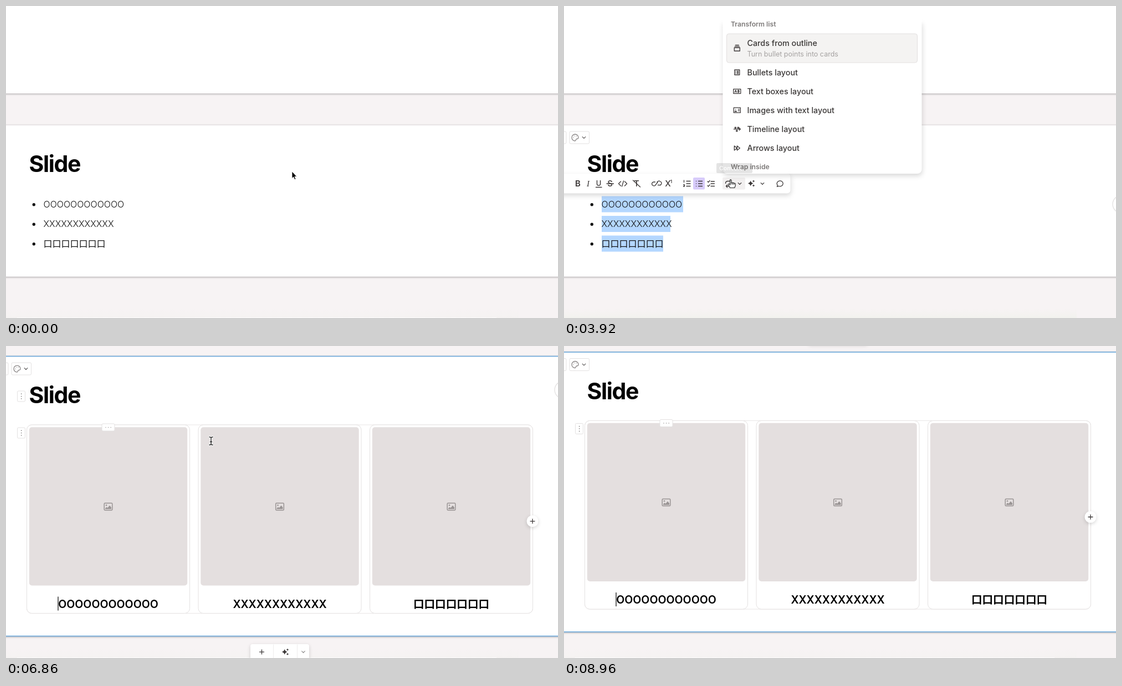
An HTML page that plays this animation: 996 by 562 pixels, repeating every 9100 ms.

```html
<!DOCTYPE html>
<html lang="en">
<head>
<meta charset="utf-8">
<title>Slide list to image layout</title>
<style>
  html, body { margin: 0; width: 100%; height: 100%; overflow: hidden; background: #f7f3f4; }
  svg { display: block; width: 996px; height: 562px; font-family: Inter, "Noto Sans CJK JP", "Noto Sans CJK SC", sans-serif; font-optical-sizing: none; }
  .card { fill: #fff; stroke: #e4e0e1; filter: drop-shadow(0 1px 1.5px rgba(0,0,0,.28)); }
  .card.active { stroke: #72abdb; stroke-width: 1.7; }
  .chip { fill: #fff; stroke: #e3e1e1; }
  .float { fill: #fff; filter: drop-shadow(0 2px 3px rgba(0,0,0,.16)); }
  .panel { fill: #fff; filter: drop-shadow(1px 4px 4px rgba(0,0,0,.15)); }
  .line { fill: none; stroke: #3c3838; stroke-width: 1.3; stroke-linecap: round; stroke-linejoin: round; }
  .soft { stroke: #8b8787; }
  .title { font-size: 41px; font-weight: 700; letter-spacing: -1.35px; }
  .list { font-size: 16px; font-weight: 300; fill: #111; }
  .caption { font-size: 19.6px; font-weight: 600; text-anchor: middle; }
  .head { font-size: 12.2px; font-weight: 600; fill: #7d7a79; }
  .item { font-size: 14.3px; font-weight: 500; fill: #3a3736; }
  .sub { font-size: 12.5px; fill: #a5a2a1; }
  .tip { font-size: 10.6px; font-weight: 600; fill: #fff; }
  .mark { fill: #3c3838; font-size: 15px; font-weight: 600; text-anchor: middle; }
</style>
</head>
<body>
<svg viewBox="0 0 996 562">
  <defs>
    <linearGradient id="dusk" x2="0" y2="1">
      <stop stop-color="#f3f2ef" stop-opacity="0"/><stop offset="1" stop-color="#f2f2ee"/>
    </linearGradient>
    <path id="chevron" class="line" d="M-2.8 -1.4L0 1.4L2.8 -1.4"/>
    <path id="plus" class="line" d="M-4 0H4M0 -4V4"/>
    <path id="star" fill="#3c3838" d="M0 -5Q.9 -.9 5 0Q.9 .9 0 5Q-.9 .9 -5 0Q-.9 -.9 0 -5Z"/>
    <g id="sparkle">
      <use href="#star" x="-1.3"/>
      <use href="#star" transform="translate(4 -4)scale(.46)"/>
      <use href="#star" transform="translate(4 4)scale(.46)"/>
    </g>
    <g id="addBar">
      <rect class="float" x="441" y="14.5" width="106" height="28" rx="4"/>
      <path stroke="#efeded" d="M482.5 15V42M525.5 15V42"/>
      <use href="#plus" x="461.5" y="28.5"/>
      <use href="#sparkle" x="504" y="28.5"/>
      <use href="#chevron" x="536.5" y="28.5" opacity=".55"/>
    </g>
    <g id="handle">
      <rect class="chip" x="20.5" y="-9.5" width="14" height="19" rx="2"/>
      <path class="line" d="M27.7 -4.3v.1M27.7 0v.1M27.7 4.3v.1" stroke-width="1.7"/>
    </g>
    <g id="more">
      <rect class="chip" x="-11.5" y="-6.5" width="23" height="13" rx="2"/>
      <path class="line soft" d="M-4.6 0h.1M0 0h.1M4.6 0h.1" stroke-width="1.8"/>
    </g>
    <g id="picture">
      <rect x="-7.3" y="-6.3" width="14.6" height="12.6" rx="1.5" fill="none" stroke="#999494" stroke-width="1.5"/>
      <circle cx="-3.5" cy="-2.5" r="1.3" fill="#999494"/>
      <path fill="#999494" d="M-5.5 4.5V3L-3 .8L-1 2.2L2.5 -2L5.5 1.5V4.5Z"/>
    </g>
  </defs>

  <rect width="996" height="562" fill="#f7f3f4"/>
  <rect id="dock" y="545" width="925" height="17" fill="url(#dusk)"/>
  <path id="edge" d="M20 561.5H885" stroke="#fdfcfc"/>

  <g id="page">
    <rect class="card" x="-20" y="-300" width="1036" height="457.5"/>
    <use id="prevBar" href="#addBar" y="158"/>
    <rect id="card" class="card" x="-20" y="214.5" width="1036"/>
    <use id="bar" href="#addBar"/>
    <g id="palette">
      <rect class="chip" x="-20" y="226" width="24" height="22" rx="2"/>
      <rect class="chip" x="10" y="226" width="35.5" height="22" rx="2"/>
      <g transform="translate(20 237)">
        <path class="line soft" d="M0 -6A6 6 0 1 0 0 6C2 6 .8 3.4 2.4 2.6S6 3 6 0A6 6 0 0 0 0 -6Z"/>
        <path class="line soft" d="M-3 0v.1M-1.5 -3v.1M2 -2.6v.1" stroke-width="1.6"/>
      </g>
      <use href="#chevron" x="36" y="237" opacity=".8"/>
    </g>
    <text class="title" x="41.5" y="299">Slide</text>
    <g id="list" class="list"></g>
    <g id="gallery">
      <rect x="37.5" y="338" width="913" height="339.5" rx="9" fill="none" stroke="#e9e6e6"/>
    </g>
    <use id="rowHandle" href="#handle"/>
    <use id="titleHandle" href="#handle" y="286.5"/>
    <circle id="comment" class="chip" cx="1006" r="16" stroke-width="1.3"/>
  </g>

  <g id="format">
    <rect class="panel" x="-20" y="302" width="428.5" height="35.5" rx="6"/>
    <rect x="233" y="309" width="21" height="21.5" rx="2" fill="#d7cbfa"/>
    <rect id="convertHover" x="286" y="309" width="41" height="21.5" rx="2" fill="#f2f0f0"/>
    <g class="mark">
      <text x="25" y="325">B</text>
      <text x="43.5" y="325" font-style="italic" font-weight="500" font-family="Liberation Serif, serif">I</text>
      <text x="62.5" y="324" font-size="13" font-weight="500">U</text>
      <text x="83" y="325" font-weight="500">S</text>
      <text x="131" y="325" font-weight="500">T</text>
      <text x="187.5" y="325" font-weight="500">X</text>
      <text x="193.5" y="319" font-size="8">1</text>
    </g>
    <path class="line" d="M57.5 326.5H68M77 320H89.500
      M102.500 316l-4 4l4 4M109.500 316l4 4l-4 4M107.500 315l-3 10M124.500 314l13 12
      M165 322.500l4 -5M164.500 317l-2.500 0a3.300 3.300 0 0 0 -2 6q2.500 2 5 0M168 317q3 -3 5.500 -1a3.300 3.300 0 0 1 -2 6.500h-2
      M221 315.500h7M221 320h7M221 324.500h7M216.500 314v3.500M215.500 322h2v1.500l-2 1.500h2
      M242.500 315.500h7M242.500 320h7M242.500 324.500h7M238.500 315.500h.1M238.500 320h.1M238.500 324.500h.1
      M265 316h6.500M265 320h6.500M265 324.500h6.500M259 316l1.500 1.500l2.500 -3M259 323.500l1.500 1.500l2.500 -3
      M291.500 319.500q0 -4 4 -4h6l-2 -2.300M301.500 315.500l-2 2.300M302.500 320.500q0 4 -4 4h-6l2 -2.300M292.500 324.500l2 2.300
      M386.500 324.500l-2 1l.7 -2.800a5.500 5 0 1 1 2.500 1.800z"/>
    <use href="#chevron" x="317" y="320"/>
    <use href="#sparkle" x="338" y="319.500"/>
    <use href="#chevron" x="358" y="320"/>
  </g>

  <g id="menu">
    <path class="panel" d="M286.500 28H645.500V294a8 8 0 0 1 -8 8H294.500a8 8 0 0 1 -8 -8Z"/>
    <rect x="286" y="0" width="360" height="29" fill="#fff"/>
    <rect id="hover" x="293.500" width="344" rx="4" fill="#f4f3f2" stroke="#e2dfdf"/>
    <text class="head" x="301" y="37.300">Transform list</text>
    <text class="sub" x="330.500" y="91">Turn bullet points into cards</text>
    <text class="head" x="301" y="293.800">Wrap inside</text>
  </g>

  <g id="convertTip">
    <rect x="275" y="283" width="65" height="18" rx="2" fill="#333"/>
    <text class="tip" x="280" y="296">Convert</text>
  </g>
  <g id="editTip">
    <rect x="460" y="110" width="67.500" height="21.500" rx="2" fill="#302e2e"/>
    <text class="tip" x="466" y="124.700">Edit image</text>
  </g>

  <g id="cursor">
    <path id="arrow" d="M0 0V12.500L2.800 9.900L4.800 14.600L6.900 13.700L4.900 9.200H8.600Z" stroke="#fff" stroke-width=".8"/>
    <g id="beam" fill="none" stroke-linecap="round">
      <path id="beamShape" d="M-3.300 -7.200Q0 -7.200 0 -5Q0 -7.200 3.300 -7.200M0 -5V5M-3.300 7.200Q0 7.200 0 5Q0 7.200 3.300 7.200M-1.600 1.500H1.600" stroke="#fff" stroke-width="3"/>
      <use href="#beamShape" style="stroke:#222"/>
      <path d="M-3.300 -7.200Q0 -7.200 0 -5Q0 -7.200 3.300 -7.200M0 -5V5M-3.300 7.200Q0 7.200 0 5Q0 7.200 3.300 7.200M-1.600 1.500H1.600" stroke="#222" stroke-width="1.300"/>
    </g>
    <path id="hand" d="M-3.500 7.500L-6.500 1.800Q-7 0 -5 .3L-3.300 2.200V-6.200Q-2.200 -8 -1 -6.200V-1.500Q.3 -2.800 1.500 -1.200Q2.800 -2.300 4 -.6Q5.600 -1.300 6.300 .4V3.500L4.800 7.500ZM-1 -1.500V1.500M1.500 -1.200V1.800M4 -.6V2" fill="#fff" stroke="#222" stroke-width="1.100" stroke-linejoin="round"/>
  </g>
</svg>
<script>
const el = id => document.getElementById(id);
const add = (id, markup) => el(id).insertAdjacentHTML('beforeend', markup);
const LOOP = 9100, STEP = 70, CONVERTED = 5670;

const rows = [
  { text: 'O'.repeat(12), y: 357, end: 215, pitch: 11.95 },
  { text: 'X'.repeat(12), y: 392.5, end: 192, pitch: 10 },
  { text: '口'.repeat(7), y: 428, end: 179, pitch: 15.9 }
];
rows.forEach((row, i) => {
  add('list', `<rect id="sel${i}" y="${row.y - 14.5}" height="29" fill="#b4d7ff"/>
    <circle cx="50.300" cy="${row.y + .8}" r="2.700"/><text x="67.500" y="${row.y + 5.800}">${row.text}</text>`);
  const x = 184.5 + i * 309.5;
  add('gallery', `<rect x="${x - 147}" y="338" width="294" height="339.500" rx="9" fill="#fff" stroke="#e4e1e1"/>
    <rect id="image${i}" x="${x - 142.700}" y="342.300" width="285.400" height="285.200" rx="5"/>
    <use href="#picture" x="${x}" y="485.300"/><use id="more${i}" href="#more" x="${x}" y="342.500"/>
    <text class="caption" x="${x}" y="667.600">${row.text}</text>`);
});
add('gallery', `<circle class="float" cx="950" cy="511.500" r="10.500"/><use href="#plus" x="950" y="511.500"/>
  <path id="caret" d="M94 647.500V672.500" stroke="#000" stroke-width="1.200"/>`);

const icons = [
  'M-5 -1h10v6h-10zM-4 -3.200h8M-3 -5.500h6',
  'M-4.500 -4.500h9v9h-9zM-2.500 -2h.1M0 -2h2.500M-2.500 0h.1M0 0h2.500M-2.500 2h.1M0 2h2.500',
  'M-6.500 -4h13v8h-13zM-4 2l1.500 -4l1.500 4M1.500 -2v4h1.500q1.500 -1 0 -2q1.200 -1 0 -2z',
  'M-6 -4.500h12v9h-12zM-4 2.500q1.500 -2.500 3 0zM-2.500 -1.500v.2M2 -1.500h2M2 1h2',
  'M-6 0h12l-2 -2M6 0l-2 2M-4 -3.500h2v2h-2zM1 -3.500h2v2h-2zM-1.500 2h2v2h-2z',
  'M-5 -4l5 4l-5 4zM0 -4l5 4l-5 4z'
];
const itemY = i => i ? 119.5 + 34.1 * (i - 1) : 76;
['Cards from outline', 'Bullets layout', 'Text boxes layout', 'Images with text layout', 'Timeline layout', 'Arrows layout']
  .forEach((label, i) => add('menu', `<path class="line" transform="translate(312.300 ${itemY(i)})" d="${icons[i]}"/>
    <text class="item" x="330.500" y="${i ? itemY(i) + 5.100 : 71.500}">${label}</text>`));

// Pointer stops: time, x, y
const path = [
  [0, 516, 298], [420, 227, 440], [630, 227, 440], [840, 203, 429], [1260, 203, 429], [1680, 190, 430],
  [1750, 190, 430], [2030, 113, 392], [2240, 63, 357], [2520, 63.5, 358.5], [2660, 63.5, 358.5],
  [3430, 303, 320], [4410, 303, 320], [4970, 366, 179], [6090, 366, 179], [6370, 370, 171],
  [7140, 370, 171], [7560, 423, 129], [7770, 430, 112], [7910, 430, 112], [8260, 440, 68],
  [8470, 440, 68], [8680, 446, -20], [LOOP, 446, -20]
];
const ramp = (t, a, b) => Math.min(1, Math.max(0, (t - a) / (b - a)));
const smooth = k => k * k * (3 - 2 * k);
const within = (t, a, b) => t >= a && t < b;
const show = (id, alpha) => el(id).setAttribute('opacity', +alpha);
const set = (id, attrs) => { for (const k in attrs) el(id).setAttribute(k, attrs[k]); };

function pointer(t) {
  const i = path.findIndex(stop => stop[0] > t);
  const [t0, x0, y0] = path[i - 1], [t1, x1, y1] = path[i];
  const k = smooth(ramp(t, t0, t1));
  return [x0 + (x1 - x0) * k, y0 + (y1 - y0) * k];
}

function selectText(t, x, row) {
  rows.forEach(({ end, pitch }, i) => {
    const chars = Math.max(0, Math.round((x - 68) / pitch));
    const start = i === row && t < 2240 ? 68 + chars * pitch : 68;
    const on = t >= 1330 && i >= row;
    set('sel' + i, { x: start, width: on ? Math.max(0, end - start) : 0 });
  });
}

function draw(t) {
  const [x, y] = pointer(t);
  const converted = t >= CONVERTED;
  const row = y < 375 ? 0 : y < 410 ? 1 : 2;
  const scroll = converted ? 131 + 72.5 * smooth(ramp(t, 6580, 6930)) : 0;
  const bottom = converted ? 718.5 : 487.5;
  const onTitle = within(t, CONVERTED, 6930) || within(t, 7980, 8540);
  const intro = ramp(t, 70, 280);

  set('page', { transform: `translate(0 ${-scroll})` });
  set('card', { height: bottom - 214.5 });
  el('card').classList.toggle('active', within(t, 1330, 3850) || converted);
  set('bar', { y: bottom });
  show('bar', converted ? 1 - ramp(t, 8540, 8680) : intro * (1 - ramp(t, 2730, 2870)));
  show('prevBar', ramp(t, 8540, 8680));
  show('palette', intro);
  show('dock', within(t, 3850, CONVERTED) ? 1 : .35);
  show('edge', !within(t, 3850, CONVERTED));

  show('list', !converted);
  selectText(t, x, row);
  show('gallery', converted);
  const hovered = within(t, 6930, 7630);
  rows.forEach((_, i) => {
    set('image' + i, { fill: i === 1 && hovered ? '#b8b4b1' : '#e4dfdf' });
    show('more' + i, i === 0 || (i === 1 && hovered));
  });
  show('caret', Math.floor((t - CONVERTED) / 500) % 2 === 0);

  set('rowHandle', { y: converted ? 352.5 : rows[row].y });
  show('rowHandle', within(t, 280, 2730) || converted);
  show('titleHandle', onTitle);
  const commentY = !converted ? rows[row].y : t < 7210 || t >= 7980 ? 275 : 357.5;
  set('comment', { cy: commentY });
  show('comment', within(t, 210, 8540));

  show('format', converted ? 0 : ramp(t, 2660, 2870));
  show('convertHover', within(t, 3290, 4480));
  show('menu', converted ? 0 : ramp(t, 3780, 3920));
  const active = y > 273 ? 0 : Math.max(0, Math.round((y - 119.5) / 34.1) + 1);
  const height = active ? 34 : 52;
  set('hover', { y: itemY(active) - height / 2, height });
  show('convertTip', ramp(t, 3430, 3570) * (1 - ramp(t, 3780, 3940)));
  show('editTip', ramp(t, 7210, 7350) * (1 - ramp(t, 7560, 7700)));

  const shape = t < 280 ? 'arrow' : t > 2730 && y < 338 && t < 5600 ? 'hand' : 'beam';
  for (const id of ['arrow', 'beam', 'hand']) show(id, id === shape);
  set('cursor', { transform: `translate(${x} ${y})` });
}

const began = performance.now();
function tick() {
  const t = (performance.now() - began) % LOOP;
  draw(Math.floor(t / STEP) * STEP);
  requestAnimationFrame(tick);
}
tick();
</script>
</body>
</html>
```
